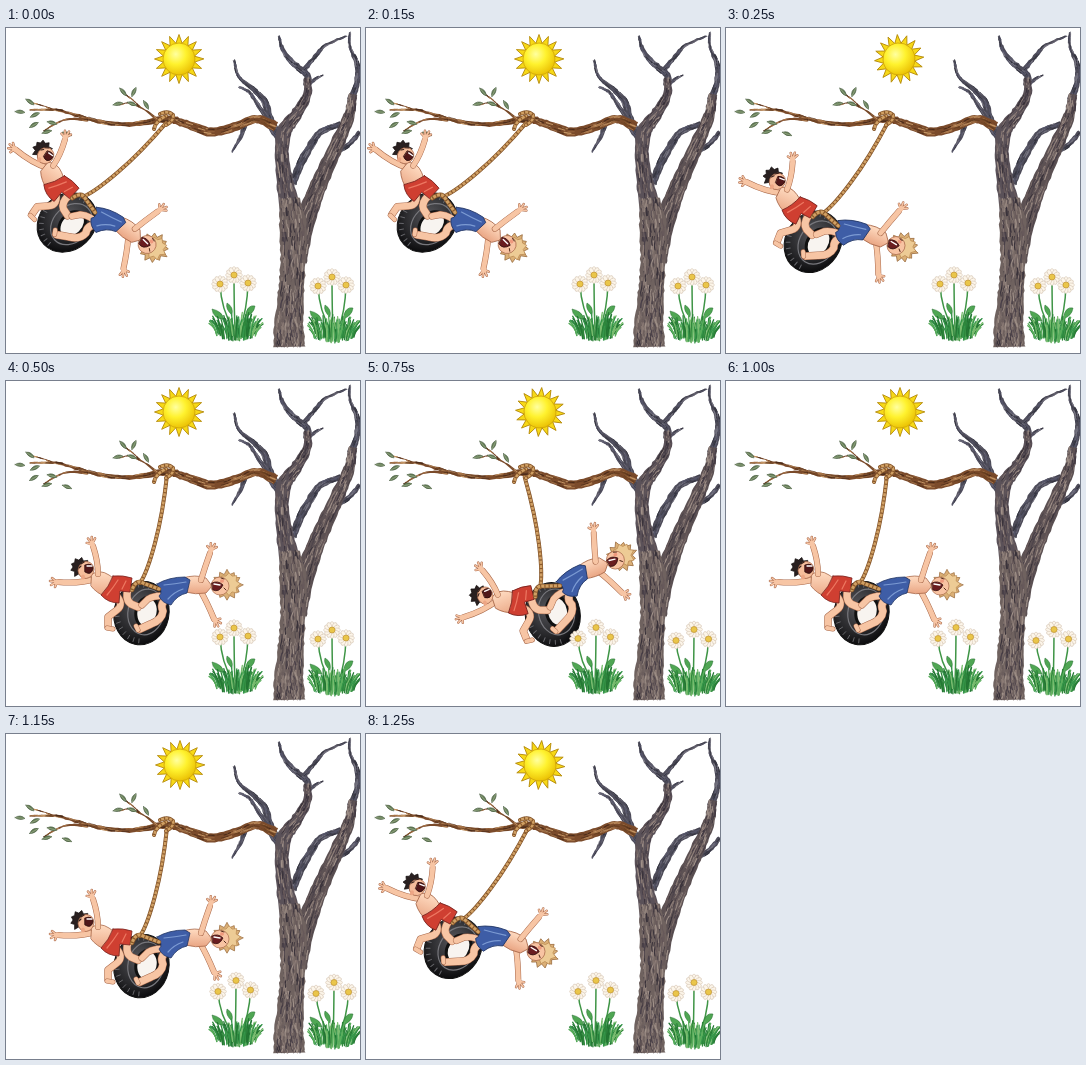
Write an HTML page that moves like this. It is 354 px wide and 325 px high and loops after 1500 ms.

```html
<!DOCTYPE html>
<html lang="en">
<head>
<meta charset="utf-8">
<title>Tire swing</title>
<style>
html, body { margin: 0; width: 100%; height: 100%; overflow: hidden; background: #fff; }
svg { display: block; width: 100%; height: 100%; }
path, line { stroke-linecap: round; stroke-linejoin: round; }
</style>
</head>
<body>
<svg id="stage" viewBox="0 0 354 325" xmlns="http://www.w3.org/2000/svg">
  <defs>
    <radialGradient id="sunFill" cx=".4" cy=".35" r=".7">
      <stop offset="0" stop-color="#ffffa0"/><stop offset=".45" stop-color="#fff22e"/><stop offset="1" stop-color="#e9bd00"/>
    </radialGradient>
    <linearGradient id="skin" x1="0" y1="0" x2="0" y2="1">
      <stop offset="0" stop-color="#ffdcc2"/><stop offset="1" stop-color="#e9a583"/>
    </linearGradient>
    <radialGradient id="rubber" cx=".42" cy=".4" r=".62">
      <stop offset="0" stop-color="#55555a"/><stop offset=".65" stop-color="#29292c"/><stop offset="1" stop-color="#0c0c0e"/>
    </radialGradient>
  </defs>
  <g id="tree"></g>
  <g id="sun"></g>
  <g id="swing"></g>
  <g id="knot"></g>
  <g id="garden"></g>
</svg>
<script>
const NS = 'http://www.w3.org/2000/svg';
const layer = id => document.getElementById(id);

function add(parent, tag, attrs) {
  const el = document.createElementNS(NS, tag);
  for (const key in attrs) el.setAttribute(key, attrs[key]);
  return parent.appendChild(el);
}
const shape = (g, d, fill, stroke = 'none', width = 1) =>
  add(g, 'path', { d, fill, stroke, 'stroke-width': width });
const stroke = (g, d, color, width) => shape(g, d, 'none', color, width);
const oval = (g, cx, cy, rx, ry, fill, line = 'none', width = 1, turn = 0) =>
  add(g, 'ellipse', { cx, cy, rx, ry, fill, stroke: line, 'stroke-width': width, transform: `rotate(${turn} ${cx} ${cy})` });

let seed = 7;
const rnd = (a = 0, b = 1) => {
  seed = (seed * 16807) % 2147483647;
  return a + (b - a) * seed / 2147483647;
};
const pick = list => list[Math.floor(rnd(0, list.length))];
const polygon = pts => 'M' + pts.map(p => p.map(v => v.toFixed(1)).join(' ')).join('L');

// Samples a smooth curve through "x,y,width" points.
function sample(text) {
  const p = text.split(' ').map(s => s.split(',').map(Number));
  const out = [];
  for (let i = 0; i < p.length - 1; i++) {
    const a = p[Math.max(i - 1, 0)], b = p[i], c = p[i + 1], d = p[Math.min(i + 2, p.length - 1)];
    for (let t = 0; t < 1; t += .125) {
      out.push([0, 1, 2].map(k => b[k] + .5 * t * (c[k] - a[k] +
        t * (2 * a[k] - 5 * b[k] + 4 * c[k] - d[k] + t * (3 * (b[k] - c[k]) + d[k] - a[k])))));
    }
  }
  return out.concat([p[p.length - 1]]);
}

// A tapered limb with rough edges and bark streaks along it.
function limb(text, base, tones, rough = .5) {
  const g = layer('tree'), pts = sample(text);
  const at = (i, side) => {
    const a = pts[Math.max(i - 1, 0)], b = pts[Math.min(i + 1, pts.length - 1)];
    const len = Math.hypot(b[0] - a[0], b[1] - a[1]) || 1, [x, y, w] = pts[i];
    return [x - (b[1] - a[1]) / len * w * side / 2, y + (b[0] - a[0]) / len * w * side / 2];
  };
  const edge = side => pts.map((p, i) => at(i, side).map(v => v + rnd(-rough, rough)));
  shape(g, polygon(edge(1).concat(edge(-1).reverse())) + 'Z', base);
  const streaks = pts.reduce((sum, p) => sum + p[2], 0) / 3;
  for (let n = 0; n < streaks; n++) {
    const i = Math.floor(rnd(0, pts.length - 2)), side = rnd(-.85, .85);
    const run = [i, i + 1, i + 2].map(k => at(k, side + rnd(-.06, .06)));
    stroke(g, polygon(run), pick(tones), rnd(.4, 1.3).toFixed(1));
  }
}

function drawTree() {
  const grey = ['#39323a', '#8e7e78', '#a1928a', '#67595a', '#494049'];
  const slate = ['#34343f', '#777582', '#56566a'];
  const brown = ['#4b2b1a', '#a77448', '#c29464', '#694021'];
  [
    '228,32,2 233,49,3 248,62,5 259,74,7 265,96,9 277,112,12',
    '233,59,2 243,64,3 252,77,4 264,94,5',
    '248,89,4 240,95,5 235,108,4 226,124,1',
    '273,8,2 277,22,4 287,35,6 301,47,7 301,58,8',
    '341,8,1.5 320,17,3 309,29,4 298,42,5',
    '317,47,1.5 308,52,3 301,58,4',
    '344,4,2 344,19,3 351,36,5 351,55,6 345,72,8',
    '354,104,4 342,117,5 326,126,6',
    '335,96,5 315,104,6 304,119,8 293,139,8 287,156,7'
  ].forEach(text => limb(text, '#4d4b58', slate));
  limb('301,50,7 301,67,9 290,87,12 278,104,15 276,130,14 280,160,18 286,190,24', '#5a5158', grey);
  limb('347,66,8 343,88,11 333,112,14 319,143,16 307,171,18 297,202,20 293,235,15', '#5c5153', grey);
  limb('284,170,20 287,200,27 287,235,25 285,265,26 283,295,29 283,319,32', '#6f625f', grey, .8);
  limb('270,99,10 251,91,8 231,98,9 205,104,9 180,96,8 160,91,7 130,96,5 102,95,4 76,89,3.5 50,82,2 24,82,1', '#7b4b2b', brown);
  limb('82,92,3 64,91,2 51,95,1.5 38,103,1', '#7b4b2b', brown, .2);
  limb('152,92,3 139,82,1.5 124,75,1 113,77,.8', '#7b4b2b', brown, .2);
  limb('135,80,1.5 128,73,1 119,66,.8', '#7b4b2b', brown, .2);
  limb('48,82,1.5 38,78,1 27,75,.8', '#7b4b2b', brown, .2);

  const leaves = [[24, 74, 35], [14, 84, 5], [29, 87, -25], [28, 97, -30], [41, 104, -15], [46, 95, 15],
    [61, 106, 20], [112, 76, -10], [117, 64, 50], [128, 64, -65], [126, 76, 20], [140, 77, 60]];
  for (const [x, y, turn] of leaves) {
    const leaf = add(layer('tree'), 'g', { transform: `translate(${x} ${y}) rotate(${turn})` });
    shape(leaf, 'M-5 0Q0-4 5 0Q0 3-5 0', '#68805a', '#465a3f', .6);
    stroke(leaf, 'M-4 0H4', '#a9b994', .5);
  }
}

function drawSun() {
  const g = layer('sun');
  const star = Array.from({ length: 32 }, (_, i) => {
    const r = i % 2 ? 16 : 24.5, a = i * Math.PI / 16;
    return [r * Math.cos(a), r * Math.sin(a)];
  });
  shape(g, polygon(star) + 'Z', '#f7d917', '#b58a08', .9);
  oval(g, 0, 0, 16, 16, 'url(#sunFill)', '#cfa208', .8);
}

function rope(g, d, width = 4) {
  stroke(g, d, '#805127', width);
  stroke(g, d, '#d0a064', width - 1.4);
  const twist = stroke(g, d, '#8a592c', width - 1);
  twist.setAttribute('stroke-dasharray', '1.2 3');
  twist.style.strokeLinecap = 'butt';
}

function flesh(g, d, width) {
  stroke(g, d, '#a9694b', width + 1);
  stroke(g, d, '#f7c5a4', width);
}

function hand(g, x, y, turn) {
  const palm = add(g, 'g', { transform: `translate(${x} ${y}) rotate(${turn})` });
  flesh(palm, 'M0 0L2-5M0 0L6-3M0 0L7 1M0 0L5 4', 1.5);
  oval(palm, 0, 0, 2.6, 2.6, '#f7c5a4');
}

function hair(g, x, y, rx, ry, spikes, fill, line) {
  const pts = Array.from({ length: spikes * 2 }, (_, i) => {
    const a = i * Math.PI / spikes, k = i % 2 ? .78 : rnd(1, 1.2);
    return [x + rx * k * Math.cos(a), y + ry * k * Math.sin(a)];
  });
  shape(g, polygon(pts) + 'Z', fill, line, .7);
}

function drawTire(g) {
  oval(g, 135.5, 232, 27.5, 32, 'url(#rubber)', '#111', 1, 12);
  for (let a = 95; a < 300; a += 13) {
    const t = a * Math.PI / 180, c = Math.cos(t), s = Math.sin(t);
    stroke(g, `M${135 + 22 * c} ${232 + 26 * s}L${135 + 26 * c} ${232 + 30 * s}`, '#67676b', 1);
  }
  oval(g, 140, 231, 18, 23, 'none', '#77777c', 1.2, 12);
  oval(g, 141, 231, 11, 15, '#f8f4f0', '#111', 3, 12);
}

function drawDarkHairedBoy(g) {
  flesh(g, 'M122 208Q119 219 125 223L132 226', 7);
  flesh(g, 'M109 213Q119 223 111 229L102 236L102 245', 6.5);
  flesh(g, 'M101 247L107 248', 4);
  flesh(g, 'M90 198Q72 203 52 201', 5);
  hand(g, 51, 201, 180);
  shape(g, 'M86 193Q94 188 103 194L113 201L102 217Q90 212 85 205Z', 'url(#skin)', '#a9694b', .8);
  flesh(g, 'M92 193Q92 180 87 165', 5);
  hand(g, 86, 163, -100);
  shape(g, 'M107 195Q117 194 126 197L124 211L114 210L113 222Q102 222 95 214Q103 206 107 195Z', '#cf3f31', '#78211d', .8);
  stroke(g, 'M112 199Q107 207 101 214M120 200L116 208', '#ed7862', 1.2);
  hair(g, 74, 186, 9, 9, 9, '#292020', '#151010');
  oval(g, 80, 189, 7.8, 8.5, '#f6bd9b', '#a9694b', .7, 20);
  oval(g, 77, 196, 2, 2.5, '#eda685');
  shape(g, 'M79 184Q87 181 87 188Q85 195 79 191Z', '#501719', '#2b0c0c', .8);
  stroke(g, 'M81 185L86 185', '#fff', 1.3);
  stroke(g, 'M75 183L78 181M73 187L75 185', '#33201b', 1.1);
}

function drawBlondBoy(g) {
  flesh(g, 'M162 216Q151 213 142 218L136 224', 6);
  flesh(g, 'M163 216Q153 222 157 230Q156 239 145 243L134 248', 7);
  flesh(g, 'M132 249L130 245', 4);
  flesh(g, 'M194 209Q201 221 208 238', 5);
  hand(g, 209, 239, 55);
  shape(g, 'M177 197Q189 193 200 197L206 205L200 212Q190 214 179 211Z', 'url(#skin)', '#a9694b', .8);
  flesh(g, 'M195 199Q199 186 204 172', 5);
  hand(g, 205, 169, -65);
  shape(g, 'M151 203Q163 196 179 196L184 199L181 212Q171 214 165 224Q156 222 153 215Q158 211 151 203Z', '#3e5da6', '#213564', .8);
  stroke(g, 'M158 204Q169 203 180 201M162 218Q168 211 177 208', '#7c9bd3', 1.2);
  hair(g, 221, 204, 14, 14, 12, '#dbb077', '#97683a');
  hair(g, 223, 203, 10, 11, 8, '#edcb95', '#bb8a52');
  oval(g, 214, 205, 9, 9, '#f8c3a2', '#a9694b', .7);
  shape(g, 'M206 202Q212 199 217 204Q213 212 207 209Z', '#6a1d20', '#351010', .8);
  stroke(g, 'M208 203L214 204', '#fff', 1.4);
  oval(g, 216, 200, 2, 1.7, '#ee987d');
  stroke(g, 'M215 197L218 198M218 207L220 209', '#57311f', 1);
}

function drawSwing() {
  const g = layer('swing');
  drawTire(g);
  rope(g, 'M161 94Q157 132 149 162T134 202');
  drawDarkHairedBoy(g);
  drawBlondBoy(g);
  rope(g, 'M126 209Q130 198 137 202L153 208', 4.5);
}

function drawKnot() {
  const g = layer('knot');
  rope(g, 'M148 101Q150 92 160 88', 4);
  rope(g, 'M154 86Q162 82 167 87Q169 92 160 97', 4);
}

// Each bloom: head x, head y, stem foot x, sway x, sway y.
const blooms = [[214, 256, 227, -2, 1.5], [228, 247, 229, 2, -.5], [242, 255, 234, 2.5, 1]];
const flowers = [];

function drawClump(dx, dy) {
  const g = add(layer('garden'), 'g', { transform: `translate(${dx} ${dy})` });
  for (const bloom of blooms) {
    const stem = stroke(g, '', '#3f9546', 1.5);
    const head = add(g, 'g', {});
    for (let a = 0; a < 360; a += 30) {
      const petal = oval(head, 0, -4.8, 2, 3.6, '#fcf5e9', '#cfbdaa', .5);
      petal.setAttribute('transform', `rotate(${a})`);
    }
    oval(head, 0, 0, 3.1, 3, '#eac64a', '#b9892a', .6);
    flowers.push({ bloom, stem, head });
  }
  shape(g, 'M218 291Q207 291 206 281Q216 283 218 291M239 289Q241 276 249 278Q248 286 239 289M226 287Q219 281 221 275Q228 279 226 287', '#4fa653', '#2b7135', .5);
  for (let n = 0; n < 115; n++) {
    const u = rnd(-1, 1), x = 230 + u * 20, y = 312 - u * u * 5 + rnd(-5, 1);
    const h = rnd(10, 24) * (1 - .35 * u * u), lean = u * 6 + rnd(-3, 3);
    stroke(g, `M${x} ${y}q${lean * .2} ${-h * .6} ${lean} ${-h}`, pick(['#237533', '#35954a', '#59ae5c', '#2c8439', '#7bbd70']), 1.3);
  }
}

function swayFlowers(sway) {
  for (const { bloom: [x, y, foot, dx, dy], stem, head } of flowers) {
    const hx = x + dx * sway, hy = y + dy * sway;
    stem.setAttribute('d', `M${foot} 300Q${foot + (hx - foot) * .9} 282 ${hx} ${hy}`);
    head.setAttribute('transform', `translate(${hx} ${hy})`);
  }
}

// Swing angle, pivot and how far the flowers lean, held for one step each.
const STEP = 250;
const poses = [
  { angle: 34.4, pivot: [159, 93], sway: 0, sun: 0 },
  { angle: 21.6, pivot: [159, 96], sway: 0, sun: -4 },
  { angle: 0, pivot: [160, 95], sway: 0, sun: 0 },
  { angle: -22, pivot: [165, 101], sway: 1, sun: 4 },
  { angle: 0, pivot: [160, 95], sway: 1, sun: 0 },
  { angle: 21.6, pivot: [159, 96], sway: 1, sun: 4 }
];

function render(time) {
  const { angle, pivot, sway, sun } = poses[Math.floor(time / STEP) % poses.length];
  layer('swing').setAttribute('transform', `rotate(${angle} ${pivot.join(' ')})`);
  layer('sun').setAttribute('transform', `translate(${173 + sway} 31) rotate(${sun})`);
  swayFlowers(sway);
}

drawTree();
drawSun();
drawSwing();
drawKnot();
drawClump(0, 0);
drawClump(98, 2);

const start = performance.now();
function tick() {
  render(performance.now() - start);
  requestAnimationFrame(tick);
}
tick();
</script>
</body>
</html>
```
